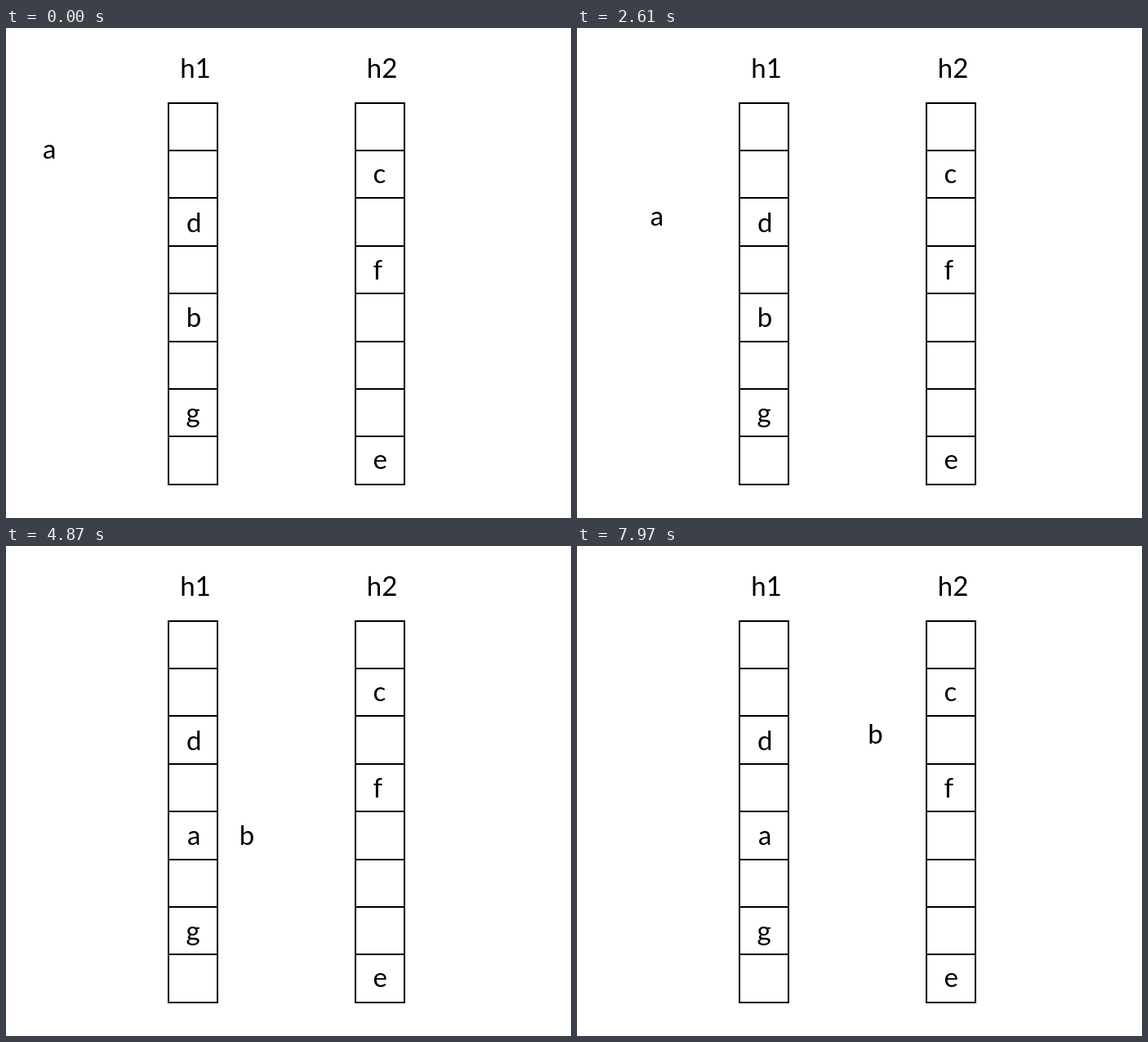
Recreate the animation shown at these times as an HTML page with a canvas. Size 692 by 600 pixels, loop 8 s.

```html
<!DOCTYPE html>
<html lang="en">
<head>
<meta charset="utf-8">
<title>Cuckoo hashing</title>
<style>
  html, body { margin: 0; width: 100%; height: 100%; overflow: hidden; background: #fff; }
  canvas { display: block; }
</style>
</head>
<body>
<canvas id="stage" width="692" height="600"></canvas>
<script>
const ctx = document.getElementById('stage').getContext('2d');

const LOOP = 8000;
const STEP = 40, STEP_OFFSET = 1130;
const FADE = 500;
const MOVE = 1073;
const ROWS = 8, CELL_W = 60, CELL_H = 58.4, TABLE_TOP = 91.5;

const clamp = v => Math.min(1, Math.max(0, v));
const between = (t, from, to) => t >= from && t < to;

// Slow start and end, fast middle.
function ease(u) {
  const half = v => 0.5 * Math.pow(2 * v, 2.4);
  return u < 0.5 ? half(u) : 1 - half(1 - u);
}

const progress = (t, start) => ease(clamp((t - start) / MOVE));

function drawTable(x) {
  ctx.beginPath();
  for (let row = 0; row <= ROWS; row++) {
    const y = Math.round(TABLE_TOP + row * CELL_H);
    ctx.moveTo(x - 1, y);
    ctx.lineTo(x + CELL_W + 1, y);
  }
  for (const side of [x, x + CELL_W]) {
    ctx.moveTo(side, TABLE_TOP);
    ctx.lineTo(side, TABLE_TOP + ROWS * CELL_H);
  }
  ctx.strokeStyle = '#000';
  ctx.lineWidth = 2;
  ctx.stroke();
}

// Centres the visible ink of the text on x.
function drawText(text, x, baseline) {
  const m = ctx.measureText(text);
  const inkShift = (m.actualBoundingBoxRight - m.actualBoundingBoxLeft) / 2;
  ctx.fillText(text, x - inkShift, baseline);
}

// Fades in, then straight out again.
function drawArrow(t, start, x1, y1, x2, y2) {
  const alpha = clamp(1 - Math.abs(t - start - FADE) / FADE);
  if (!alpha) return;
  const length = Math.hypot(x2 - x1, y2 - y1), head = 12;
  ctx.save();
  ctx.globalAlpha = alpha;
  ctx.fillStyle = '#ffc000';
  ctx.translate(x1, y1);
  ctx.rotate(Math.atan2(y2 - y1, x2 - x1));
  ctx.beginPath();
  ctx.moveTo(0, -2);
  ctx.lineTo(length - head, -2);
  ctx.lineTo(length - head, -6);
  ctx.lineTo(length, 0);
  ctx.lineTo(length - head, 6);
  ctx.lineTo(length - head, 2);
  ctx.lineTo(0, 2);
  ctx.fill();
  ctx.restore();
}

function draw(time) {
  const t = STEP_OFFSET + STEP * Math.floor((time - STEP_OFFSET) / STEP);
  ctx.fillStyle = '#fff';
  ctx.fillRect(0, 0, 692, 600);
  drawTable(199);
  drawTable(428);

  ctx.fillStyle = '#000';
  ctx.font = '33px Lato, sans-serif';
  drawText('h1', 232, 61);
  const blinkedOff = between(time, 4330, 4870) || between(time, 5370, 5870);
  if (!blinkedOff) drawText('h2', 461, 61);

  drawText('d', 230, 249.5);
  drawText('g', 229.5, 483);
  drawText('c', 457.5, 189.5);
  drawText('f', 455.5, 308);
  drawText('e', 458.5, 540);

  const approach = progress(t, 2121);
  const push = progress(t, 3195);
  const leave = progress(t, 7327);
  drawText('a', 53 + 112 * approach + 65 * push, 160 + 206 * approach);
  drawText('b', 230.7 + 65 * push + 100 * leave, 366 - 176 * leave);

  drawArrow(t, 1112, 53, 177, 188.5, 353.5);
  drawArrow(t, 6362, 294, 325.5, 416.5, 176.5);
}

const began = performance.now();
function tick() {
  draw((performance.now() - began) % LOOP);
  requestAnimationFrame(tick);
}
tick();
</script>
</body>
</html>
```
